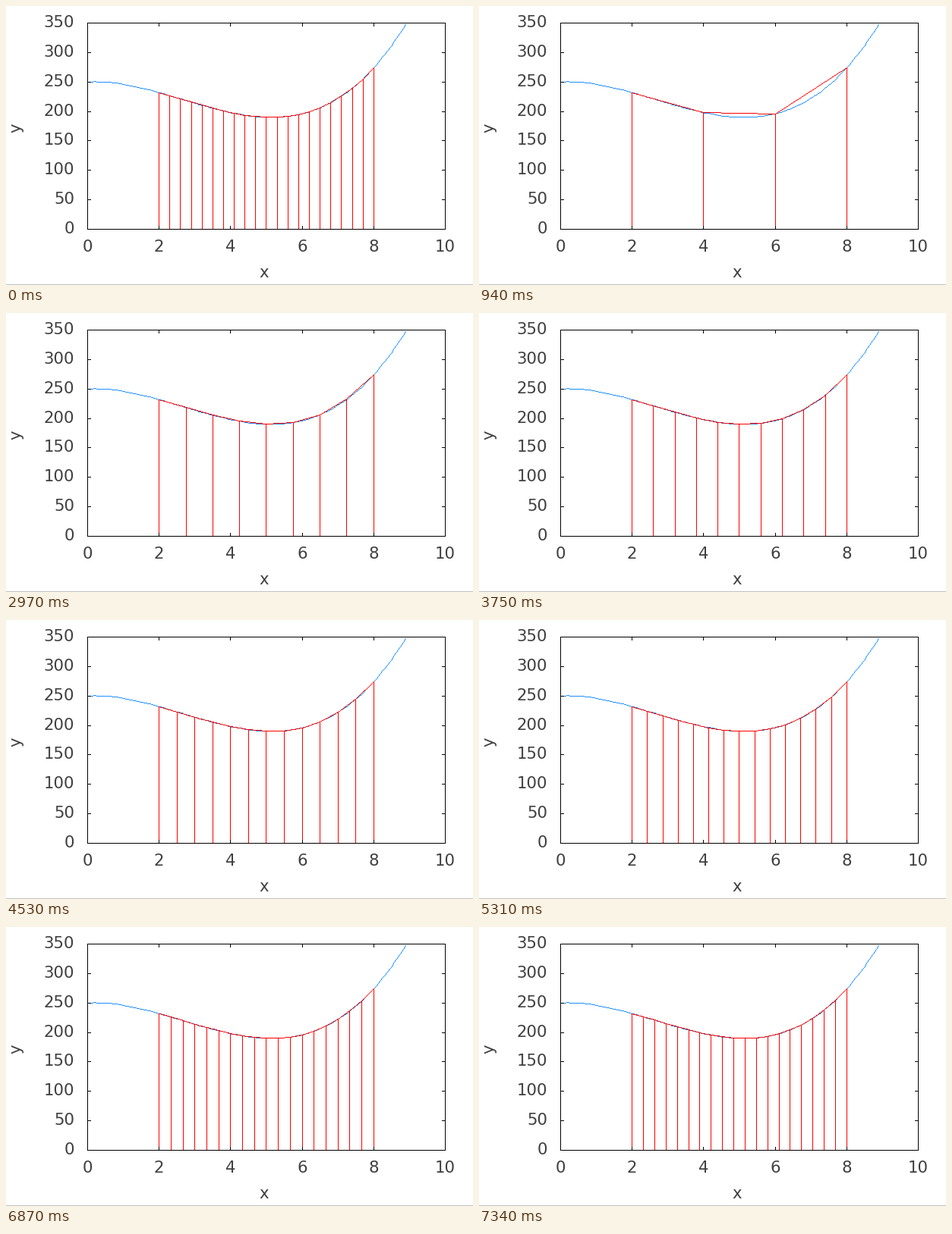
A matplotlib script that plays this animation: 615x368 px, repeating every 7.43 s.

```python
import numpy as np
import matplotlib.pyplot as plt
from matplotlib.animation import FuncAnimation
from matplotlib.collections import PolyCollection

W, H, DPI = 615, 368, 100
PX = 72 / DPI                      # one pixel in points
LOOP, STEP = 7430, 10
LEFT, RIGHT, TOP, BOTTOM = 107, 578, 22, 294
X_MAX, Y_MAX = 10, 350
TICK = 4
A, B = 2, 8                        # integration limits

# Start time of each subdivision count 1, 2, 3 ...; before the first it is 20.
STARTS = [150, 530, 940, 1330, 1730, 2190, 2500, 2970, 3350, 3750,
          4150, 4530, 4930, 5310, 5710, 6110, 6560, 6870, 7340]


def f(x):
    return x**3 - 8 * x**2 + 3 * x + 250


def px(x):
    return np.rint(LEFT + np.asarray(x) / X_MAX * (RIGHT - LEFT))


def py(y):
    return np.rint(BOTTOM - np.asarray(y) / Y_MAX * (BOTTOM - TOP))


def box(x0, y0, x1, y1):
    """Rectangle covering the given pixels, both ends included."""
    x0, x1 = min(x0, x1), max(x0, x1) + 1
    y0, y1 = min(y0, y1), max(y0, y1) + 1
    return [(x0, y0), (x1, y0), (x1, y1), (x0, y1)]


def polyline(xs, ys):
    """One-pixel polyline without smoothing, as a list of pixel boxes."""
    dots = []
    for x0, y0, x1, y1 in zip(xs, ys, xs[1:], ys[1:]):
        n = int(max(abs(x1 - x0), abs(y1 - y0))) + 1
        for x, y in zip(np.rint(np.linspace(x0, x1, n)),
                        np.rint(np.linspace(y0, y1, n))):
            dots.append(box(x, y, x, y))
    return dots


def paint(color, z, boxes=()):
    shapes = PolyCollection(boxes, facecolors=color, edgecolors="none",
                            linewidths=0, zorder=z)
    ax.add_collection(shapes, autolim=False)
    return shapes


def label(x, y, text, **kw):
    ax.text(x, y, text, family="DejaVu Sans", size=21.33 * PX,
            color="#404040", **kw)


fig = plt.figure(figsize=(W / DPI, H / DPI), dpi=DPI, facecolor="white")
ax = fig.add_axes([0, 0, 1, 1])
ax.set(xlim=(0, W), ylim=(H, 0))
ax.axis("off")

# Frame, inward ticks and tick labels
frame = [box(LEFT, TOP, RIGHT, TOP), box(LEFT, BOTTOM, RIGHT, BOTTOM),
         box(LEFT, TOP, LEFT, BOTTOM), box(RIGHT, TOP, RIGHT, BOTTOM)]
for v in range(0, X_MAX + 1, 2):
    x = px(v)
    frame += [box(x, BOTTOM - TICK, x, BOTTOM), box(x, TOP, x, TOP + TICK)]
    label(x + 0.5, 324, str(v), ha="center", va="baseline")
for v in range(0, Y_MAX + 1, 50):
    y = py(v)
    frame += [box(LEFT, y, LEFT + TICK, y), box(RIGHT - TICK, y, RIGHT, y)]
    label(90, y + 6, str(v), ha="right", va="baseline")
paint("black", 4, frame)
label(340, 358, "x", ha="center", va="baseline")
label(13, 161, "y", ha="center", va="center", rotation=90)
paint("#c0c0c0", 1, [box(0, H - 1, W - 1, H - 1)])

# The curve stops at its last sample inside the frame
xs = np.linspace(0, X_MAX, 100)
xs = xs[f(xs) <= Y_MAX]
paint("#1e90ff", 2, polyline(px(xs), py(f(xs))))


def trapezoids(n):
    x = np.linspace(A, B, n + 1)
    us, vs = px(x), py(f(x))
    return polyline(us, vs) + [box(u, v, u, BOTTOM) for u, v in zip(us, vs)]


shapes = {n: trapezoids(n) for n in range(1, 21)}
red = paint("red", 3)


def update(i):
    n = sum(i * STEP >= s for s in STARTS) or 20
    red.set_verts(shapes[n])
    return [red]


anim = FuncAnimation(fig, update, frames=LOOP // STEP, interval=STEP,
                     repeat=True, repeat_delay=0, blit=False)
plt.show()
```
